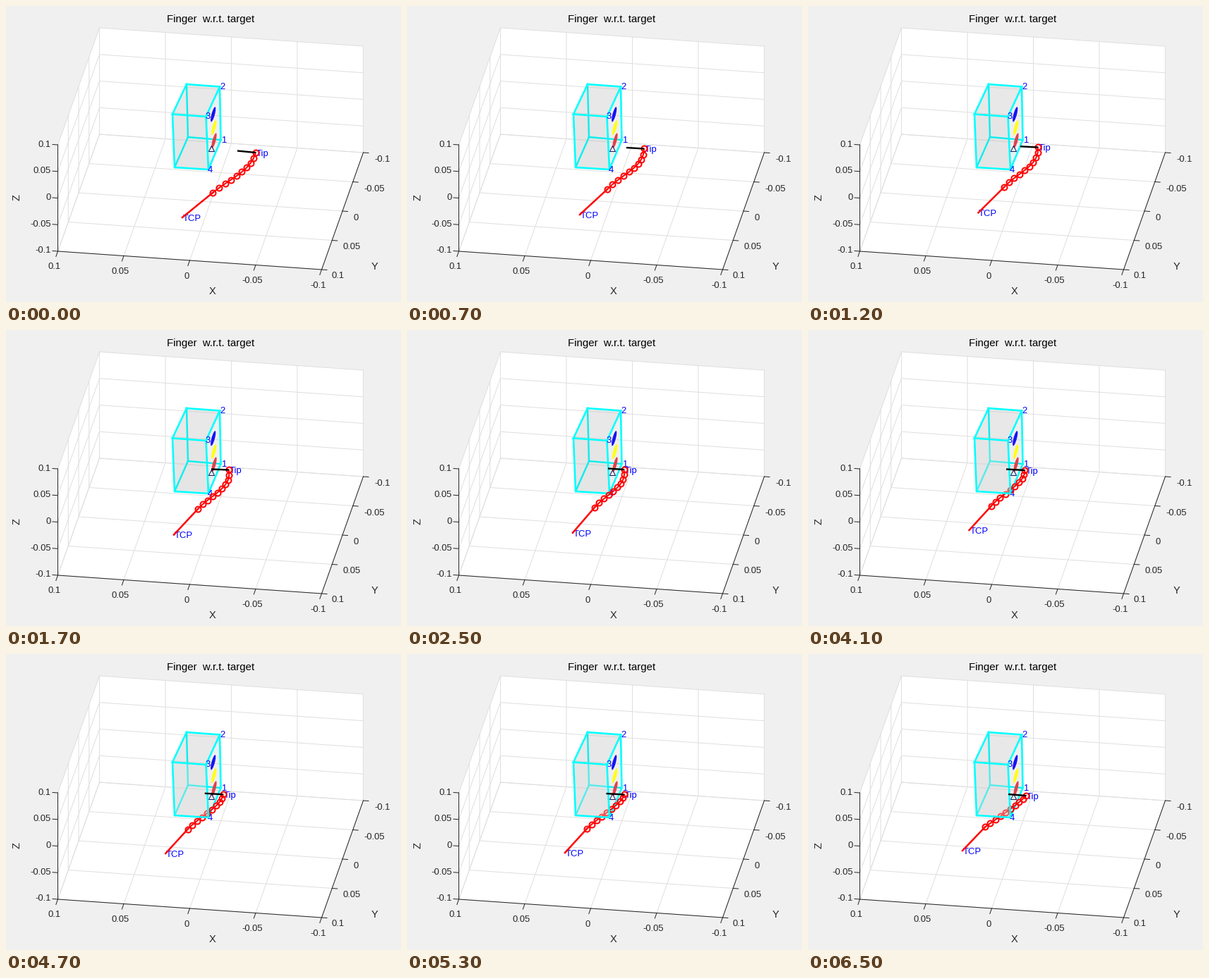
Recreate the animation shown at these times as a matplotlib script. Size 560 px wide and 420 px high, loop 6.6 s.

```python
import numpy as np
import matplotlib.pyplot as plt
from matplotlib.animation import FuncAnimation
from matplotlib.patches import Ellipse, Polygon

W, H, DPI = 560, 420, 100
FRAMES, STEP = 66, 100
PT = 72 / DPI  # points per pixel
DARK, BLUE = "#262626", "#0000ff"

plt.rcParams["font.family"] = "Liberation Sans"
fig = plt.figure(figsize=(W / DPI, H / DPI), dpi=DPI, facecolor="#f0f0f0")
ax = fig.add_axes([0, 0, 1, 1])
ax.set(xlim=(0, W), ylim=(H, 0))
ax.axis("off")


def line(points, color, width, z, **kw):
    x, y = np.transpose(points)
    return ax.plot(x, y, color=color, lw=width * PT, zorder=z, **kw)[0]


def face(points, color, z, alpha=1.0):
    patch = Polygon(points, fc=color, ec="none", alpha=alpha, zorder=z)
    return ax.add_patch(patch)


def label(x, y, s, size=13, color=DARK, ha="left", z=5, **kw):
    return ax.text(x, y, s, fontsize=size * PT, color=color, ha=ha,
                   va="center_baseline" if kw.pop("base", False) else "center",
                   zorder=z, **kw)


# Axes box: a corner plus one vector along each direction
ORIGIN = np.array([73.5, 348.0])
EX, EY, EZ = np.array([[374, 26], [59, -166], [0, -151]], float)


def at(x, y, z):
    return ORIGIN + x * EX + y * EY + z * EZ


face([at(0, 0, 0), at(1, 0, 0), at(1, 1, 0), at(1, 1, 1), at(0, 1, 1),
      at(0, 0, 1)], "white", 0)
for k in np.linspace(0, 1, 5):
    line([at(k, 0, 0), at(k, 1, 0), at(k, 1, 1)], "#dfdfdf", 1, 1)
    line([at(0, k, 1), at(0, k, 0), at(1, k, 0)], "#dfdfdf", 1, 1)
    line([at(0, 0, k), at(0, 1, k), at(1, 1, k)], "#dfdfdf", 1, 1)
line([at(0, 0, 1), at(0, 0, 0), at(1, 0, 0), at(1, 1, 0)], DARK, 1, 2)

TICKS = ["0.1", "0.05", "0", "-0.05", "-0.1"]
for i, k in enumerate(np.linspace(0, 1, 5)):
    line([at(k, 0, 0), at(k, -0.045, 0)], DARK, 1, 2)
    line([at(1, k, 0), at(1.02, k, 0)], DARK, 1, 2)
    line([at(0, 0, k), at(-0.02, 0, k)], DARK, 1, 2)
    label(69 + 93.5 * i, 370 + 6.8 * i, TICKS[i], ha="center")
    label(462 + 15.2 * i, 383.5 - 41.3 * i, TICKS[i])
    label(63.5, 347.5 - 37.7 * i, TICKS[-1 - i], ha="right")

label(290, 19.5, "Finger  w.r.t. target", 15, "black", "center")
label(293, 405, "X", 14.67, ha="center")
label(523, 370, "Y", 14.67, ha="center")
label(15, 272, "Z", 14.67, ha="center", rotation=90)

# Block: b/f back or front, l/r left or right, t/u top or under
blt, brt, flt, frt = (256, 111), (303, 114.5), (236, 153.5), (283.5, 157)
blu, bru, flu, fru = (258, 186), (304.5, 190), (239, 229), (287, 232)
CYAN = "#00ffff"
FRONT = [flt, frt, fru, flu]

face([flt, blt, brt, frt], "#cccccc", 2, 0.45)
face([frt, brt, bru, fru], "#cccccc", 2, 0.3)
face(FRONT, "#cccccc", 2, 0.5)
for end in (blt, bru, flu):
    line([blu, end], "#0ceeee", 2.4, 3)
for a, b in [(flt, blt), (blt, brt), (brt, frt), (brt, bru), (bru, fru)]:
    line([a, b], CYAN, 2.6, 4)
rim = line(FRONT + [flt], CYAN, 2.6, 4, solid_joinstyle="round")
veil = face(FRONT, "#e6e6e6", 7.5, 0.35)

for (x, y), c in [((293.7, 153.8), "#1414f5"), ((294.7, 172.6), "#ffff14"),
                  ((295, 191), "#e0404a")]:
    ax.add_patch(Ellipse((x, y), 4.6, 22, angle=15, fc=c, ec="none", zorder=4.5))
ax.plot(290.5, 202, "^", ms=8 * PT, mfc="none", mec="#000050", mew=0.9 * PT,
        zorder=5)

for (x, y), s in [((305, 190.5), "1"), ((303, 115.5), "2"),
                  ((282.5, 157.5), "3"), ((285.3, 233.5), "4")]:
    label(x, y, s, color=BLUE)

# Poses: base, joints 0, 3, 6 and 9 of ten, pointer end
KEYS = [0, 7, 17, 25, 41, 53, 65]
POSES = np.array([
    [250, 300, 293, 265, 319, 246.5, 341, 229.5, 354, 208, 328, 205.5],
    [245, 296, 284, 260, 307, 241, 327.5, 224, 336, 202.5, 311, 201],
    [238, 290.5, 272, 254, 293, 236, 311, 219.5, 315.8, 198.5, 291, 197.5],
    [235, 287.7, 266, 251.7, 286, 234, 303, 218, 307.5, 198, 285, 196.5],
    [228.5, 284, 260, 249.5, 279.5, 232.5, 299, 216.5, 307.3, 199, 281, 197.5],
    [224, 282, 255, 248, 276, 230.5, 296.5, 214.5, 308, 199.5, 282.5, 198],
    [219, 279, 251, 245.5, 273, 230, 293.5, 215, 309, 201, 284, 199],
])
RED = "#ff0000"
arm = line([(0, 0)], RED, 2.5, 7)
joints = line([(0, 0)], RED, 2, 7, marker="o", ms=8 * PT, mfc="none",
              mec=RED, mew=2 * PT)
pointer = line([(0, 0)], "black", 2.4, 8, solid_capstyle="butt")
base_tag = label(0, 0, "TCP", color=BLUE, z=6)
tip_tag = label(0, 0, "Tip", color=BLUE, z=6)


def draw(i):
    pose = [np.interp(i, KEYS, col) for col in POSES.T]
    base, *knots, end = np.reshape(pose, (6, 2))
    curve = np.polyfit([0, 3, 6, 9], knots, 3)
    n = np.arange(10)[:, None]
    chain = sum(c * n ** p for c, p in zip(curve, (3, 2, 1, 0)))
    tip = chain[-1]

    arm.set_data(*np.transpose([base, chain[0]]))
    joints.set_data(*chain.T)
    pointer.set_data(*np.transpose([end, tip]))
    base_tag.set_position(np.round(base + (1, 2)))
    tip_tag.set_position(np.round(tip + (1.5, 2)))

    inside = i >= 33  # the finger has passed behind the front face
    veil.set_visible(inside)
    rim.set_zorder(7.6 if inside else 4)
    return arm, joints, pointer, base_tag, tip_tag


anim = FuncAnimation(fig, draw, frames=FRAMES, interval=STEP, repeat=True,
                     repeat_delay=0)
plt.show()
```
